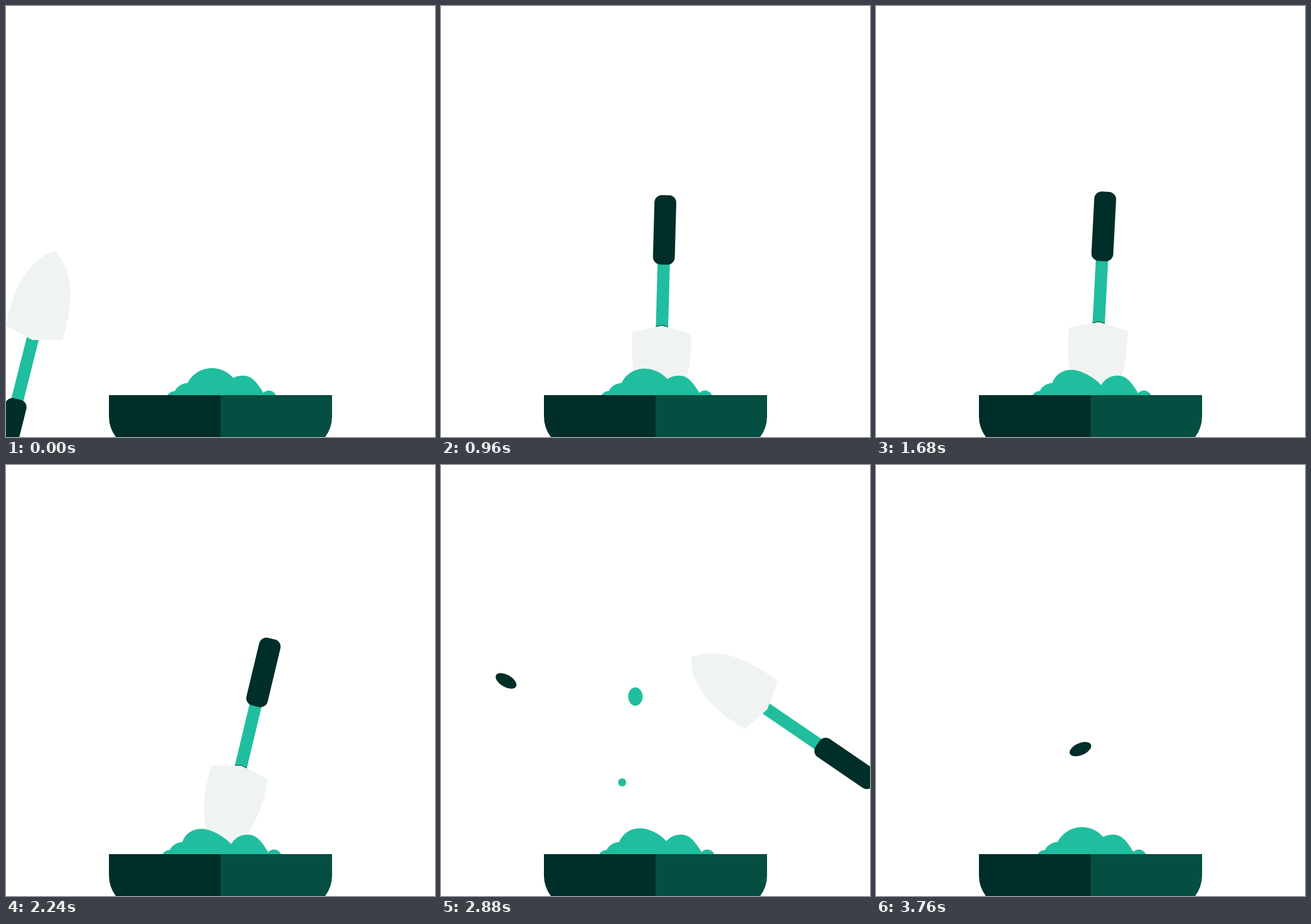
Recreate the animation shown at these times as an HTML page. Size 746 by 751 pixels, loop 3840 ms.

```html
<!DOCTYPE html>
<html lang="en">
<head>
<meta charset="utf-8">
<title>Trowel and pot</title>
<style>
  html, body { margin: 0; width: 100%; height: 100%; overflow: hidden; background: #fff; }
  svg { display: block; width: 746px; height: 751px; }
  .teal { fill: #20be9e; }
  .dark { fill: #002e29; }
</style>
</head>
<body>
<svg viewBox="0 0 746 751">
  <g id="bits">
    <ellipse id="clod" class="teal" rx="12.5" ry="16"/>
    <circle id="crumb" class="teal" r="7"/>
    <ellipse id="seed" class="dark" rx="20" ry="10.5"/>
  </g>
  <!-- local origin: middle of the blade's shoulders, tip pointing down -->
  <g id="trowel">
    <rect class="teal" x="-10.7" y="-125" width="21.4" height="118"/>
    <rect class="dark" x="-19" y="-240" width="38" height="121" rx="13"/>
    <path fill="#eff4f3" d="M0-13L51 0C54 60 44 120 0 147C-44 120-54 60-51 0Z"/>
    <path id="shade" fill="none" stroke="#002e29" d="M-10.7-10.5L0-13.2L10.7-10.5"/>
  </g>
  <g class="teal">
    <circle id="small" cy="684" r="13"/>
    <circle id="medium" cy="682" r="25"/>
    <circle id="end" cy="683" r="13"/>
    <path id="left"/>
    <path id="right"/>
  </g>
  <path class="dark" d="M179 678H373V751H191A60 60 0 0 1 179 715Z"/>
  <path fill="#054e42" d="M373 678H567V715A60 60 0 0 1 555 751H373Z"/>
</svg>
<script>
const LOOP = 3840, HOLD = 240, STEP = 80;
const $ = id => document.getElementById(id);
const set = (id, attrs) => {
  for (const name in attrs) $(id).setAttribute(name, attrs[name]);
};

// eased 0 to 1 between steps a and b
const ramp = (k, a, b) => {
  const u = Math.min(1, Math.max(0, (k - a) / (b - a)));
  return u * u * (3 - 2 * u);
};

// thrown into the pot, leaned over, then flicked out to the right
function drawTrowel(k) {
  const toss = Math.min(k, 10);
  const lean = ramp(k, 16.5, 29);
  const flick = Math.max(0, k - 29);
  const drop = Math.max(0, k - 34);

  const x = 49 + 48.3 * toss - 1.48 * toss ** 2 + 25.7 * lean + 147 * (flick / 5) ** 1.7;
  const y = Math.min(569.5, 809 - 209.5 * k + 20.5 * k * k)
    - 38 * lean ** .8 - 113 * ramp(k, 29, 34) + 10 * drop ** 2;
  const angle = 1.55 - 167.5 * (1 - toss / 10) ** 3.46 + 13.9 * lean + 159.4 * ramp(k, 29, 37);

  set('trowel', { transform: `translate(${x} ${y}) rotate(${angle})` });
  set('shade', { opacity: Math.max(0, Math.cos(angle * Math.PI / 180)) });
}

// the mounds spread while the blade is in the soil
function drawSoil(k) {
  const s = ramp(k, 9, 12.4) - ramp(k, 32, 37);
  set('small', { cx: 293 - 9 * s });
  set('medium', { cx: 316 - 9 * s });
  set('end', { cx: 457 + 9 * s });

  const a = 310 - 7 * s, tx = 358 - 17 * s, ty = 631 + 3 * s;
  const ex = 396.5 - 5 * s, ey = 650 + 11 * s;
  set('left', {
    d: `M${a} 680C${a} 653 ${tx - 27} ${ty} ${tx} ${ty}` +
       `C${tx + 15.5} ${ty} ${ex - 9} ${ey - 12} ${ex} ${ey}V680Z`
  });

  const b = 376 + 8 * s, rx = 412 + 8 * s;
  set('right', {
    d: `M${b} 680C${b + 4 * s} 660 ${rx - 20} 644 ${rx} 644` +
       `C${rx + 16} 644 ${rx + 25} 656 ${rx + 39} 680Z`
  });
}

function drawBits(k) {
  const flying = k > 30;
  set('bits', { visibility: flying ? 'visible' : 'hidden' });
  if (!flying) return;

  const u = k - 34;
  set('clod', { cx: 338 - 10 * u, cy: 358 + 9.4 * (u - 2.2) ** 2 });
  set('crumb', { cx: 315 - 16 * u, cy: 539 + 8.3 * (u - 1.3) ** 2 });

  // quick entry from the left, then a steady drift and fall
  const x = 129.9 + 20.5 * u - 4.2 * 4 ** (1 - u);
  const fall = u - 5.7;
  const y = 317 + (fall < 0 ? 1.82 : 6.34) * fall ** 2;
  set('seed', { transform: `translate(${x} ${y}) rotate(${30 + 11.5 * u})` });
}

function draw(ms) {
  const t = ms % LOOP;
  const k = t < HOLD ? 0 : 1 + Math.floor((t - HOLD) / STEP);
  drawTrowel(k);
  drawSoil(k);
  drawBits(k);
}

const start = performance.now();
function tick() {
  draw(performance.now() - start);
  requestAnimationFrame(tick);
}
tick();
</script>
</body>
</html>
```
